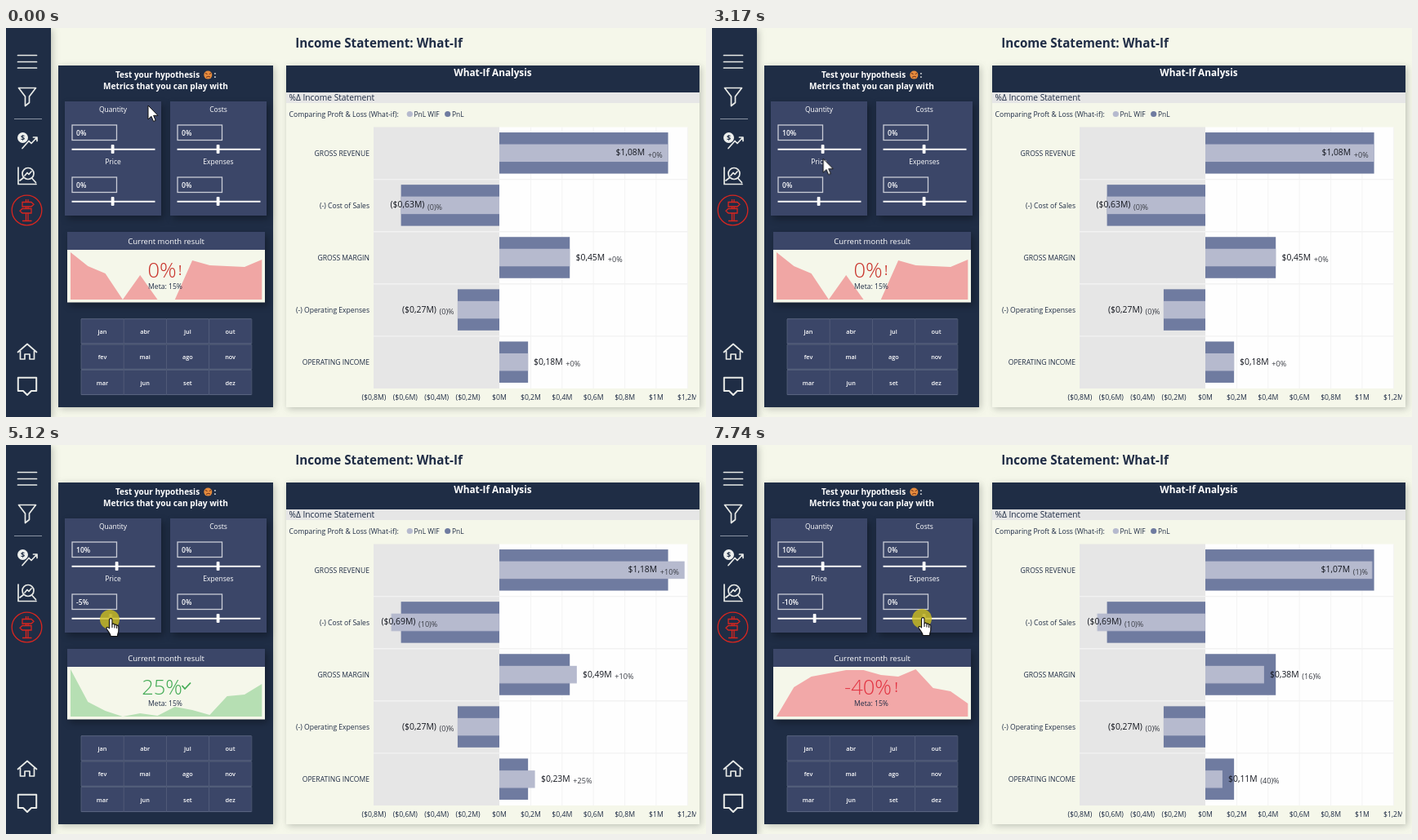
Recreate the animation shown at these times as an HTML page. Size 857 px wide and 477 px high, loop 8000 ms.

```html
<!DOCTYPE html>
<html lang="en">
<head>
<meta charset="utf-8">
<title>Income Statement: What-If</title>
<style>
html, body { margin: 0; width: 100%; height: 100%; overflow: hidden; background: #f5f7ea; }
svg { display: block; width: 857px; height: 477px; font-family: "Open Sans", "Noto Sans", sans-serif; }
.mid { text-anchor: middle; }
.end { text-anchor: end; }
.light { fill: #fff; }
.dark { fill: #1f2c45; }
.line { fill: none; stroke: #e9ebe8; stroke-width: 1.7; stroke-linejoin: round; stroke-linecap: round; }
.soft { filter: drop-shadow(2px 2px 4px rgba(60, 65, 60, .3)); }
.deep { filter: drop-shadow(3px 4px 4px rgba(0, 0, 0, .32)); }

/* one loop is 8 s, so 1% is 80 ms */
.anim { animation: 8s linear infinite; }
.step { animation: 8s step-end infinite; }

#cursor { animation-name: move; }
@keyframes move {
  0%, 8.875% { transform: translate(174px, 95px); animation-timing-function: ease-in-out; }
  15.875%, 25.2% { transform: translate(131px, 149px); }
  27.5%, 37.6% { transform: translate(137px, 151px); animation-timing-function: ease-in-out; }
  45.3%, 46.4% { transform: translate(131px, 215px); }
  47.5%, 54.4% { transform: translate(132px, 211px); }
  54.5%, 56.3% { transform: translate(133px, 211px); }
  57.6%, 63% { transform: translate(129px, 212px); }
  64%, 66.6% { transform: translate(127px, 214px); }
  66.63%, 68.8% { transform: translate(126px, 214px); }
  69.4%, 80.6% { transform: translate(124px, 214px); animation-timing-function: ease-in; }
  85.875% { transform: translate(222px, 209px); animation-timing-function: ease-out; }
  90.25%, 100% { transform: translate(257px, 213px); }
}
#hand { animation-name: hand; }
@keyframes hand {
  0%, 39%, 81% { opacity: 0; }
  15%, 44.3%, 89.3%, 100% { opacity: 1; }
}
#arrow { animation-name: arrow; }
@keyframes arrow {
  0%, 39%, 81% { opacity: 1; }
  15%, 44.3%, 89.3%, 100% { opacity: 0; }
}
#ring { animation-name: ring; }
@keyframes ring {
  0%, 18.8%, 34.5%, 60.6%, 74.75%, 94.2% { opacity: 0; }
  20.8%, 34.1%, 61.25%, 74.74%, 96.75%, 100% { opacity: 1; }
}

#quantity { animation-name: quantity; }
@keyframes quantity {
  0% { transform: none; fill: #fff; }
  15% { transform: none; fill: #b4b4b4; }
  25.75% { transform: translateX(2.5px); fill: #b4b4b4; }
  26.9% { transform: translateX(5px); fill: #b4b4b4; }
  39%, 100% { transform: translateX(5px); fill: #fff; }
}
#price { animation-name: price; }
@keyframes price {
  0% { transform: none; fill: #fff; }
  44.3% { transform: none; fill: #b4b4b4; }
  63.6% { transform: translateX(-2.5px); fill: #b4b4b4; }
  69.1% { transform: translateX(-5px); fill: #b4b4b4; }
  81%, 100% { transform: translateX(-5px); fill: #fff; }
}
#expenses { animation-name: expenses; }
@keyframes expenses { 0% { fill: #fff; } 89.3%, 100% { fill: #b4b4b4; } }

.q0 { animation-name: q0; }
.q1 { animation-name: q1; }
.q2 { animation-name: q2; }
@keyframes q0 { 0% { opacity: 1; } 25.75%, 100% { opacity: 0; } }
@keyframes q1 { 0%, 26.9%, 100% { opacity: 0; } 25.75% { opacity: 1; } }
@keyframes q2 { 0% { opacity: 0; } 26.9%, 100% { opacity: 1; } }
.p0 { animation-name: p0; }
.p1 { animation-name: p1; }
.p2 { animation-name: p2; }
@keyframes p0 { 0% { opacity: 1; } 63.6%, 100% { opacity: 0; } }
@keyframes p1 { 0%, 69.1%, 100% { opacity: 0; } 63.6% { opacity: 1; } }
@keyframes p2 { 0% { opacity: 0; } 69.1%, 100% { opacity: 1; } }

.s0 { animation-name: s0; }
.s1 { animation-name: s1; }
.s2 { animation-name: s2; }
@keyframes s0 { 0% { opacity: 1; } 48.4%, 100% { opacity: 0; } }
@keyframes s1 { 0%, 87.8%, 100% { opacity: 0; } 48.4% { opacity: 1; } }
@keyframes s2 { 0% { opacity: 0; } 87.8%, 100% { opacity: 1; } }

.wif { transform-origin: 604px 0; animation-name: wif; }
@keyframes wif {
  0%, 48.2% { transform: none; animation-timing-function: ease-in-out; }
  50.5%, 87.6% { transform: scaleX(var(--b)); animation-timing-function: ease-in-out; }
  89.75%, 100% { transform: scaleX(var(--c)); }
}
</style>
</head>
<body>
<svg id="stage" viewBox="0 0 857 477"></svg>
<script>
const NAVY = '#1f2d45', SLATE = '#3b4668', PAPER = '#f5f7ea';
const ZERO = 604, PER_M = 192, TOP = 121.5, BAND = 64.1;

const box = (x, y, w, h, fill, extra = '') =>
  `<rect x="${x}" y="${y}" width="${w}" height="${h}" fill="${fill}" ${extra}/>`;
const text = (x, y, size, str, cls = '', extra = '') =>
  `<text x="${x}" y="${y}" font-size="${size}" class="${cls}" ${extra}>${str}</text>`;
const path = (d, extra = '') => `<path d="${d}" ${extra}/>`;
const bold = 'font-weight="700"';

function sidebar() {
  const line = 'class="line"';
  return box(0, 0, 55, 477, NAVY, 'class="soft"') +
    path('M14.5 33.5H37.5M14.5 41.5H37.5M14.5 49H37.5', line) +
    path('M15.5 73.5H36.5L28.5 84V91.5L23.5 95.5V84Z', line) +
    path('M10 111.5H44', 'stroke="#8b94a3"') +
    '<circle cx="20.5" cy="134.5" r="6.5" fill="#eef0ee"/>' +
    text(20.5, 138, 9, '$', 'mid', `${bold} fill="${NAVY}"`) +
    path('M20 147.5L28 138.5 31 141.5 37.5 134.5M33.5 134H38V138.5', line) +
    path('M15 171V191.5H37M17 187L21.5 183.5M32 184.5L36.5 189.5M23 181L26 177.5 28 179.5 31 176', line) +
    '<circle cx="27" cy="178.5" r="7" class="line"/>' +
    '<g fill="none" stroke="#d8261f" stroke-width="1.3">' +
    '<circle cx="25.5" cy="223.5" r="18.3"/>' +
    path('M20 213.5H31L34 216.3 31 219H20ZM31 221.5H20L17 224.3 20 227H31ZM24.5 210V213M27 210V213M24.5 219V221M27 219V221M24.5 227V236M27 227V236M20 236.5H31.5') +
    '</g>' +
    path('M14.5 397.5L26 387.5 37.5 397.5M17.5 396V406H23V400H29V406H34.5V396', line) +
    path('M14.8 428.8H37.2V445H31L26 450 21 445H14.8Z', 'class="line" style="stroke-width:2"');
}

function slider(x, y, name, value, id) {
  return text(x + 50, y - 16, 8.5, name, 'mid light') +
    box(x, y, 54.5, 18.5, 'none', 'stroke="#c9ccd6" stroke-width="1.3"') + value +
    box(x - .5, y + 28.8, 102, 2, '#f4f4f4') +
    box(x + 47.7, y + 24, 3.8, 11, '#fff', `id="${id}" rx="1" class="step"`);
}

function values(x, y, list, key) {
  return list.map((v, i) =>
    text(x, y, 8.6, v, 'light' + (key ? ` step ${key}${i}` : ''), 'font-weight="600"')).join('');
}

function kpi(state, ys, fill, ink, label, mark) {
  const pts = ys.map((y, i) => `${(79 + i * 21.3).toFixed(1)},${y}`).join(' ');
  return `<g class="step s${state}"><polygon points="79,333 ${pts} 313.3,333" fill="${fill}"/>` +
    text(191, 306, 25.5, label, 'mid', `font-weight="300" fill="${ink}"`) + mark + '</g>';
}

function controls() {
  const months = ['jan', 'abr', 'jul', 'out', 'fev', 'mai', 'ago', 'nov', 'mar', 'jun', 'set', 'dez'];
  const bang = (x, ink) => text(x, 302.5, 16, '!', '', `fill="${ink}"`);
  return box(64, 46, 263, 419, NAVY, 'class="soft"') +
    text(134, 61, 10, 'Test your hypothesis', 'light', bold) +
    '<circle cx="247.3" cy="57.6" r="5" fill="#e58b3d"/>' +
    path('M244 55.5L246.5 56.5M251 55.5L248.8 56.5M245 60.5Q247 58.5 250 60', 'fill="none" stroke="#6b2c17"') +
    text(254.5, 61, 10, ':', 'light', bold) +
    text(195.5, 75, 10.1, 'Metrics that you can play with', 'mid light', bold) +
    box(72, 90, 118, 140, SLATE, 'class="deep"') +
    box(201, 90, 118, 140, SLATE, 'class="deep"') +
    slider(81, 119, 'Quantity', values(86, 132, ['0%', '5%', '10%'], 'q'), 'quantity') +
    slider(81, 183, 'Price', values(86, 196, ['0%', '-5%', '-10%'], 'p'), 'price') +
    slider(210, 119, 'Costs', values(215, 132, ['0%']), 'costs') +
    slider(210, 183, 'Expenses', values(215, 196, ['0%']), 'expenses') +
    box(75, 250, 242, 86.5, PAPER, 'class="deep"') +
    box(75, 250, 242, 22, SLATE) +
    text(196, 265, 9.5, 'Current month result', 'mid light') +
    kpi(0, [275, 292, 301, 333, 303, 333, 333, 285, 291, 292, 293, 284],
      '#f0a6a4', '#c9342c', '0%', bang(211, '#c9342c')) +
    kpi(1, [275, 315, 326, 333, 329, 332, 321, 325, 331, 308, 306, 293],
      '#b6dfb3', '#43ab55', '25%',
      path('M215.5 295L219 299 226 291.5', 'fill="none" stroke="#43ab55" stroke-width="1.8"')) +
    kpi(2, [333, 297, 284, 280, 276, 276, 282, 284, 275, 298, 302, 317],
      '#f2a8a8', '#e23442', '-40%', bang(223.5, '#e23442')) +
    text(195, 320, 8.6, 'Meta: 15%', 'mid dark') +
    months.map((m, i) => {
      const x = 92 + (i % 4) * 52.2, y = 357 + (i >> 2) * 31.3;
      return box(x, y, 51.7, 30, SLATE) +
        path(`M${x} ${y - .3}h52M${x} ${y + 30}h52`, 'stroke="#69738e" stroke-width=".8"') +
        path(`M${x} ${y}v30m52.2 0v-30`, 'stroke="#59637f" stroke-width=".8"') +
        text(x + 26, y + 18, 7.3, m, 'mid light', 'font-weight="600"');
    }).join('');
}

// name, base value, the two later what-if values
const rows = [
  ['GROSS REVENUE', 1.076, 1.181, 1.064],
  ['(-) Cost of Sales', -.627, -.69, -.69],
  ['GROSS MARGIN', .449, .494, .375],
  ['(-) Operating Expenses', -.266, -.266, -.266],
  ['OPERATING INCOME', .183, .227, .109]
];
// per state and row: x, amount, change
const labels = [
  [[746.5, '$1,08M', '+0%'], [470.5, '($0,63M)', '(0)%'], [697.5, '$0,45M', '+0%'], [485, '($0,27M)', '(0)%'], [646, '$0,18M', '+0%']],
  [[761.5, '$1,18M', '+10%'], [459.5, '($0,69M)', '(10)%'], [706, '$0,49M', '+10%'], [485, '($0,27M)', '(0)%'], [655, '$0,23M', '+25%']],
  [[745.5, '$1,07M', '(1)%'], [459.5, '($0,69M)', '(10)%'], [683, '$0,38M', '(16)%'], [485, '($0,27M)', '(0)%'], [632, '$0,11M', '(40)%']]
];

function bar(v, y, h, fill, extra) {
  const w = Math.abs(v) * PER_M;
  return box(v < 0 ? ZERO - w : ZERO, y, w, h, fill, extra);
}

function chart() {
  const mid = i => TOP + BAND * (i + .5);
  const ticks = ['($0,8M)', '($0,6M)', '($0,4M)', '($0,2M)', '$0M', '$0,2M', '$0,4M', '$0,6M', '$0,8M', '$1M', '$1,2M'];
  const tickX = i => 450.4 + i * 38.4;
  let out = box(343, 46, 506, 419, PAPER, 'class="soft"') +
    box(343, 46, 506, 33, NAVY) +
    text(596, 59, 11.8, 'What-If Analysis', 'mid light', bold) +
    box(343, 79, 506, 13, '#e6e6e6') +
    text(346.5, 89, 10.25, '%Δ Income Statement', 'dark') +
    text(346.5, 108.5, 8.66, 'Comparing Proft &amp; Loss (What-if):', 'dark') +
    '<circle cx="494.3" cy="105.5" r="3.6" fill="#b6bace"/>' +
    text(499.5, 108.5, 8.4, 'PnL WIF', 'dark') +
    '<circle cx="540.7" cy="105.5" r="3.6" fill="#6f7ba0"/>' +
    text(546, 108.5, 8.4, 'PnL', 'dark') +
    box(450, TOP, 154, 320.5, '#e6e6e6') +
    box(ZERO, TOP, 230.5, 320.5, '#fefefe');
  ticks.forEach((t, i) => {
    if (i > 4) out += path(`M${tickX(i)} ${TOP}V442`, 'stroke="#f3f3f3"');
    out += text(tickX(i), 456, 8.7, t, 'mid dark', 'clip-path="url(#edge)"');
  });
  rows.forEach(([name, a, b, c], i) => {
    const y = mid(i);
    if (i) out += path(`M450 ${y - BAND / 2}H834.5`, 'stroke="#f2f2f2" stroke-width="1.4"');
    out += text(445, y + 3.2, 8.6, name, 'end dark') +
      bar(a, y - 25.5, 50.5, '#6f7ba0') +
      bar(a, y - 11, 21.5, '#b6bace', `class="anim wif" style="--b:${b / a};--c:${c / a}"`);
  });
  labels.forEach((set, s) => {
    out += `<g class="step s${s}" fill="#14171f">`;
    set.forEach(([x, amount, change], i) => {
      const gap = amount[0] === '(' ? 45.5 : 39.3;
      out += text(x, mid(i) + 2.8, 10.4, amount) +
        text(x + gap, mid(i) + 5.3, 9.1, change, '', 'fill="#3a3d45"');
    });
    out += '</g>';
  });
  return out;
}

const cursor = `<g id="cursor" class="anim">
  <circle id="ring" class="anim" r="12" fill="#cdbe1e" fill-opacity=".8"/>
  <g id="hand" class="step" fill="#fff" stroke="#111" stroke-width="1.1" stroke-linejoin="round">
    <path d="M-.5 11V.5C-.5-2 3-2 3 .5V6C3.3 4.6 6 4.8 6 6.8 6.4 5.6 8.6 5.9 8.6 7.8 9 6.8 10.8 7.2 10.8 9V14C10.8 16 9.5 17 9.5 20.5H1.2C1.2 17.5-1.5 15.5-3.8 11.5-4.8 9.5-2.4 8.6-.5 11Z"/>
    <path d="M3 6V10M6 7V10.5M8.6 8V11" fill="none"/>
  </g>
  <path id="arrow" class="step" d="M0 0V17L3.9 13.3 6.6 19.5 9.2 18.4 6.6 12.3H12Z" fill="#fff" stroke="#111"/>
</g>`;

document.getElementById('stage').innerHTML =
  '<clipPath id="edge"><rect x="343" y="440" width="502" height="25"/></clipPath>' +
  box(0, 0, 857, 477, PAPER) +
  text(456.5, 24, 15.2, 'Income Statement: What-If', 'mid dark', bold) +
  controls() + chart() + sidebar() + cursor;
</script>
</body>
</html>
```
